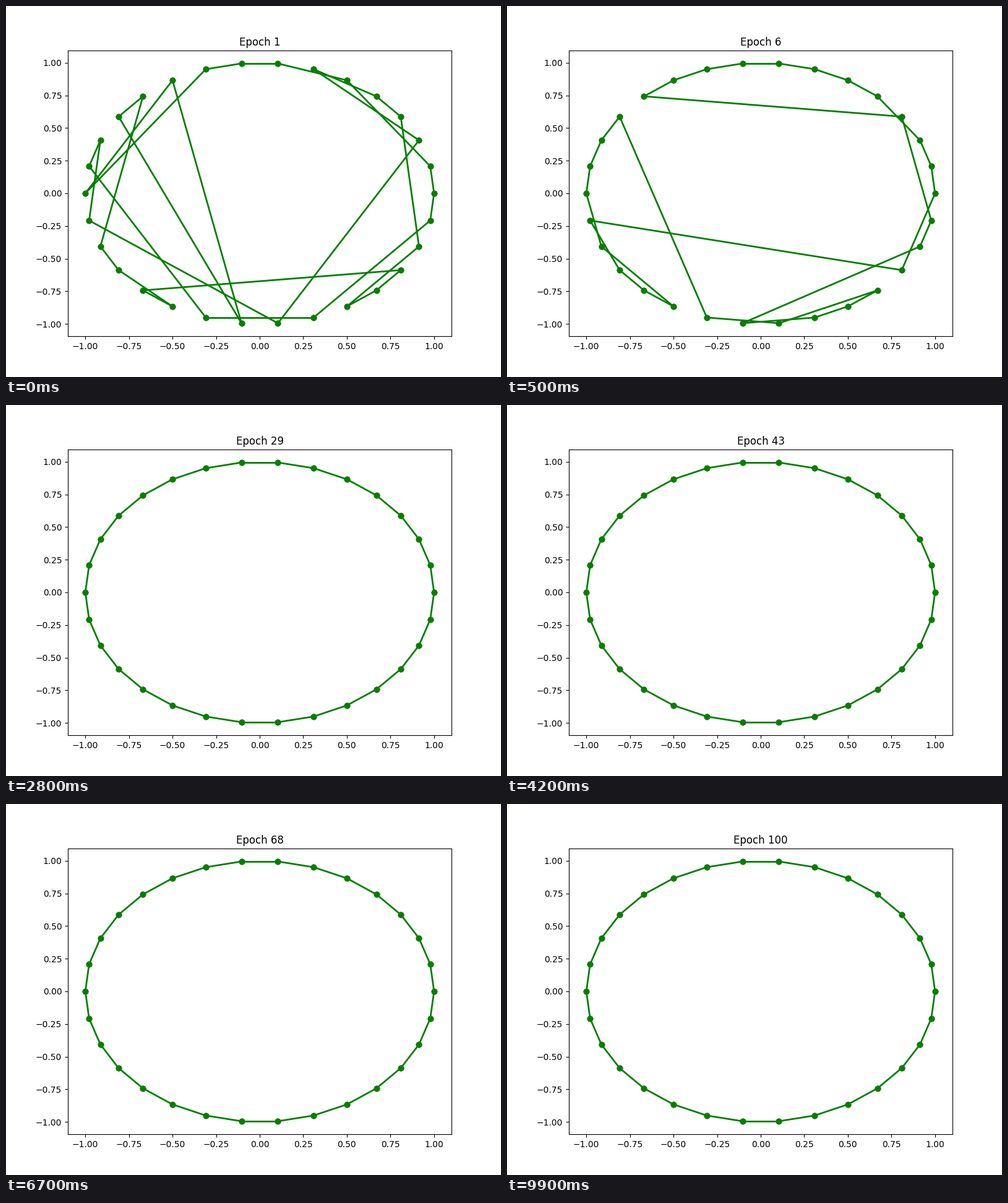
Write a matplotlib script that moves like this. It is 800 px wide and 600 px high and loops after 10 s.

```python
import numpy as np
import matplotlib.pyplot as plt
from matplotlib.animation import FuncAnimation

CITIES = 30
EPOCHS = 100

angles = 2 * np.pi * np.arange(CITIES) / CITIES
xs, ys = np.cos(angles), np.sin(angles)
circle = list(range(CITIES))


def flip(tour, a, b):
    """Reverse the stretch between cities a and b."""
    i, j = sorted((tour.index(a), tour.index(b)))
    return tour[:i] + tour[i:j + 1][::-1] + tour[j + 1:]


def pull(tour, after, *cities):
    """Take cities out of the tour and visit them right after another one."""
    rest = [c for c in tour if c not in cities]
    i = rest.index(after) + 1
    return rest[:i] + list(cities) + rest[i:]


def early_tour():
    """A clockwise lap with one long detour and a few local tangles."""
    tour = pull([0] + circle[:0:-1], 29, 24, 21, 14, 13, 16, 23, 2, 6, 4, 3)
    for a, b in ((25, 27), (19, 20), (11, 12)):
        tour = flip(tour, a, b)
    return pull(pull(tour, 12, 22), 10, 15)


def middle_tour():
    """The top is solved; the lower half is walked in swapped halves."""
    tour = pull(circle, 11, 3)
    tour = flip(flip(tour, 12, 29), 12, 20)
    tour = pull(tour, 20, 16, 27)
    tour = flip(flip(tour, 22, 26), 18, 20)
    return pull(tour, 26, 23)


def late_tour():
    """Only one stretch still runs backwards."""
    return flip(flip(circle, 2, 8), 2, 3)


def repairs(tour, goal):
    """Tours passed through while reversals turn tour into goal."""
    steps = [tour]
    for i, city in enumerate(goal):
        if tour[i] != city:
            tour = flip(tour, tour[i], city)
            steps.append(tour)
    return steps


def evolve(keys):
    """Best tour per epoch, spreading the repairs between key epochs."""
    history = {}
    for (a, tour), (b, goal) in zip(keys, keys[1:]):
        steps = repairs(tour, goal)
        for epoch in range(a, b + 1):
            history[epoch] = steps[(epoch - a) * (len(steps) - 1) // (b - a)]
    return history


history = evolve([(1, early_tour()), (6, middle_tour()),
                  (12, late_tour()), (18, circle)])

fig, ax = plt.subplots(figsize=(8, 6), dpi=100)
ax.plot(xs, ys, "ro")
# Every leg is its own line, so each city gets a marker from both sides.
legs = [ax.plot(xs[[i - 1, i]], ys[[i - 1, i]], "go-", linewidth=2)[0]
        for i in circle]
title = ax.set_title("Epoch 1")


def update(frame):
    epoch = frame + 1
    tour = history.get(epoch, circle)
    for i, leg in enumerate(legs):
        ends = [tour[i - 1], tour[i]]
        leg.set_data(xs[ends], ys[ends])
    title.set_text(f"Epoch {epoch}")
    return [*legs, title]


anim = FuncAnimation(fig, update, frames=EPOCHS, interval=100,
                     repeat=True, repeat_delay=0, blit=False)
plt.show()
```
